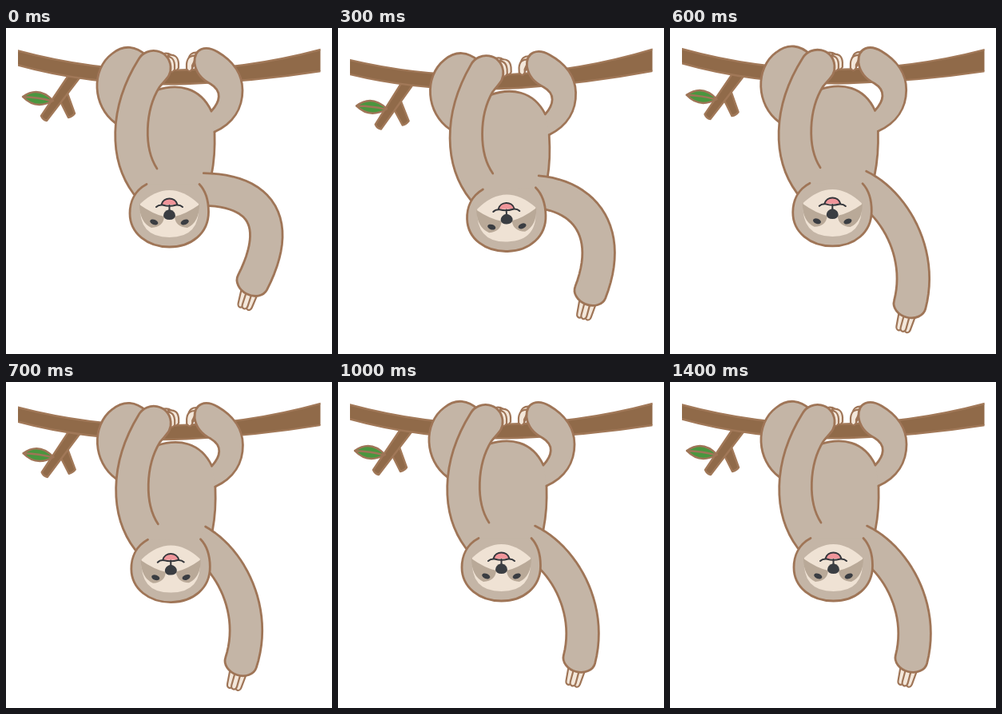
Recreate the animation shown at these times as an HTML page. Size 408 by 408 pixels, loop 1900 ms.

```html
<!DOCTYPE html>
<html lang="en">
<head>
<meta charset="utf-8">
<title>Hanging sloth</title>
<style>
  html, body { margin: 0; width: 100%; height: 100%; overflow: hidden; background: #fff; }
  svg { display: block; width: 100vw; height: 100vh; }
  .fur { fill: #c4b5a6; stroke: #9f7557; stroke-width: 2.8; }
  .line { fill: none; stroke: #9f7557; stroke-width: 2.8; }
  .flat { fill: #c4b5a6; }
  .wood { fill: #906a49; stroke: #a17858; stroke-width: 2.4; }
  .leaf { fill: #4a963f; stroke: #9f7557; stroke-width: 2.4; }
  .claw { fill: #f3e7da; stroke: #9f7557; stroke-width: 2.2; }
  .cream { fill: #efe2d4; }
  .patch { fill: #b9a998; }
  .dark { fill: #3a3d42; }
  .pink { fill: #f0959a; }
  .ink { fill: none; stroke: #34363b; stroke-width: 2; }
</style>
</head>
<body>
<svg viewBox="0 0 408 408" stroke-linecap="round" stroke-linejoin="round">
  <defs>
    <clipPath id="edge"><rect x="15" width="378.5" height="408"/></clipPath>
    <path id="toe" class="claw" d="M-9 -8 Q3 -10 4 2 V8 Q0 14 -3 8 V4 Z"/>
    <path id="claw" class="claw" d="M-3.5 0 V29 a3.5 4.5 0 0 0 7 0 V0"/>
    <g id="cheek">
      <path class="patch" d="M167 221 Q184 233 198 236 Q197 249 182 250 Q167 243 167 221 Z"/>
      <ellipse class="dark" rx="5.2" ry="3.2" transform="translate(185.3 243) rotate(20)"/>
    </g>
  </defs>

  <g clip-path="url(#edge)">
    <g class="sway">
      <path class="wood" d="M66 88 L77 82 L86 107 Q83 111 78 112 Z"/>
      <path class="wood" d="M79 58 L44 110 Q46 115 51 116 L94 60 Z"/>
      <path class="wood" d="M-5 24 L15 28.5 Q110 54 205 53 Q300 52 394 27 L420 20 V48 L394 54 Q310 67 225 70 Q110 73 15 46.5 L-5 42 Z"/>
      <path class="leaf" d="M21 86 Q41 72 59 91 Q37 103 21 86 Q42 87 56 91"/>
    </g>
  </g>

  <g class="sway">
    <use href="#toe" x="206" y="40"/>
    <use href="#toe" x="212" y="42"/>
    <use href="#toe" x="207" y="44"/>
    <g transform="translate(437 0) scale(-1 1)">
      <use href="#toe" x="205" y="39"/>
      <use href="#toe" x="207" y="43"/>
    </g>
    <path class="fur" d="M137 119 C108 98 106 52 133 32 C148 20 163 23 175 34 L150 120"/>
    <path class="flat" d="M188 78 C215 68 243 74 257 104 L270 116 L261 130 L258 185 L246 232 H165 L150 150 Z"/>
    <path class="line" d="M188 78 C215 69 243 74 257 104 M261 130 Q262 160 257 185"/>
    <path class="fur" d="M261 130 C285 119 296 100 296 78 C296 56 282 40 265 30 C250 21 235 25 236 44 C238 58 246 65 256 70 C271 79 268 92 257 104"/>
    <path class="fur" d="M160 208 C128 165 128 100 166 39 C176 22 204 26 206 48 C207 60 200 64 192 74 C174 103 172 150 189 176"/>

    <g id="claws"></g>
    <path id="arm" class="fur"/>

    <path class="fur" d="M176 195.5 C160 204 155 219 155 232 C155 257 177 274 204.5 274 C232 274 253.5 257 253.5 230 C253.5 216 250 204 242 195.5"/>
    <path class="cream" d="M168 220 Q204.5 186 241 220 Q244 262 204.5 262 Q165 262 168 220 Z"/>
    <use href="#cheek"/>
    <use href="#cheek" transform="translate(409 0) scale(-1 1)"/>
    <path class="pink" d="M194.5 221 Q196 213.5 204.5 213.5 T214.5 221 Z"/>
    <path class="ink" d="M188 224 Q191 221 196 221.5 Q204.5 224 213 221.5 Q218 221 221 224 M194.5 221 C197 211 212 211 214.5 221 M204.5 222 V230"/>
    <path class="dark" d="M204.5 227 Q212 229 212 235 Q211 240 204.5 240 Q198 240 197 235 Q197 229 204.5 227 Z"/>
  </g>
</svg>

<script>
const LOOP = 1900, STEP = 100, END = 1400;
const REACH = 600, WAVE = 400;
const HALF = 20.3;

// Centre line of the waving arm, raised and hanging
const bent = [[247, 202], [319, 203], [347, 243], [308.5, 318.5]];
const hanging = [[238, 198.5], [280, 218], [319, 281], [302, 347]];

const arm = document.getElementById("arm");
const claws = document.getElementById("claws");
const swayers = document.querySelectorAll(".sway");

claws.innerHTML = [-1, 1, 0].map(i =>
  `<use href="#claw" transform="translate(${i * 8} 1) rotate(${i * 5})"/>`).join("");

const mix = (a, b, k) => a + (b - a) * k;

function rotate([x, y], [cx, cy], deg) {
  const r = deg * Math.PI / 180, c = Math.cos(r), s = Math.sin(r);
  return [cx + (x - cx) * c - (y - cy) * s, cy + (x - cx) * s + (y - cy) * c];
}

// Point and unit direction on a cubic curve
function along([a, b, c, d], u) {
  const v = 1 - u;
  const at = i => v * v * v * a[i] + 3 * v * v * u * b[i] + 3 * v * u * u * c[i] + u * u * u * d[i];
  const slope = i => v * v * (b[i] - a[i]) + 2 * v * u * (c[i] - b[i]) + u * u * (d[i] - c[i]);
  const dx = slope(0), dy = slope(1), len = Math.hypot(dx, dy);
  return { x: at(0), y: at(1), dx: dx / len, dy: dy / len };
}

function drawArm(reach, swing) {
  const curve = bent.map((p, i) =>
    rotate(p.map((v, j) => mix(v, hanging[i][j], reach)), [250, 203], swing));
  const outer = [], inner = [];
  for (let i = 0; i <= 24; i++) {
    const { x, y, dx, dy } = along(curve, i / 24);
    outer.push([x + dy * HALF, y - dx * HALF]);
    inner.unshift([x - dy * HALF, y + dx * HALF]);
  }
  const hand = along(curve, 1);
  const turn = Math.atan2(hand.dy, hand.dx) * 180 / Math.PI - 90;
  arm.setAttribute("d",
    `M${outer.join("L")}A${HALF} 16 ${turn} 0 1 ${inner[0]}L${inner.join("L")}`);
  const tilt = 15 + 3 * (1 - reach) + swing / 3;
  claws.setAttribute("transform", `translate(${hand.x} ${hand.y}) rotate(${tilt})`);
}

function draw(t) {
  // One slow swing while the arm reaches down, then two quicker waves
  const reaching = t < REACH;
  const phase = reaching ? t / REACH : (t - REACH) / WAVE;
  const wave = Math.sin(Math.PI * phase) ** 2;
  const rebound = 0.35 * Math.exp(-(((t - REACH) / 60) ** 2));
  const sway = rebound - 2.73 * Math.exp(-t / 750) * wave;
  swayers.forEach(g => g.setAttribute("transform", `rotate(${sway} 380 30)`));
  drawArm(Math.min(1, t / REACH) ** 1.5, reaching ? 0 : 8.6 * wave);
}

function tick() {
  const t = performance.now() % LOOP;
  draw(Math.min(END, Math.floor(t / STEP) * STEP));
  requestAnimationFrame(tick);
}
tick();
</script>
</body>
</html>
```
